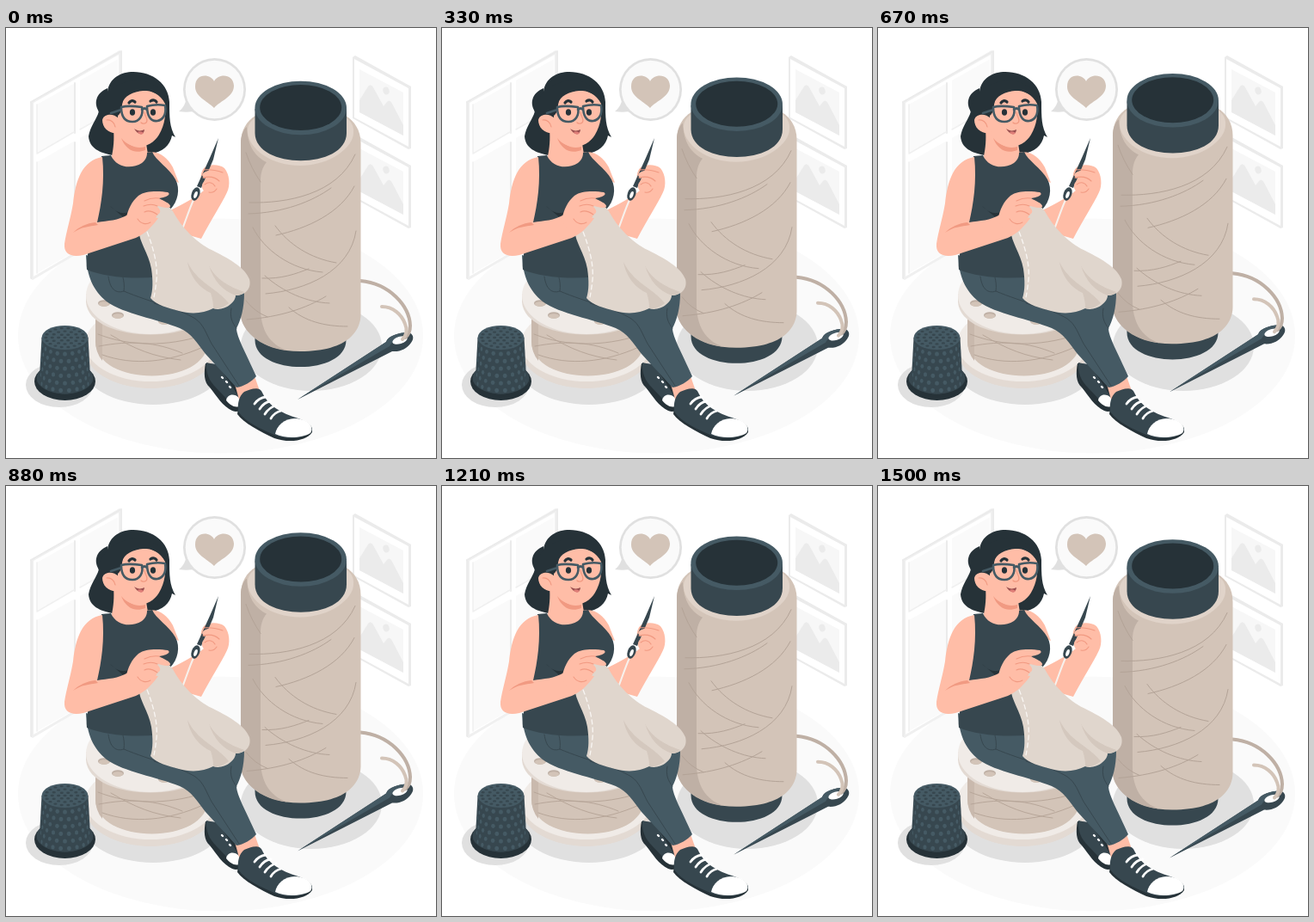
An HTML page with a canvas that plays this animation: 500 px wide and 500 px high, repeating every 1540 ms.

```html
<!DOCTYPE html>
<html lang="en">
<head>
<meta charset="utf-8">
<style>
html, body { margin: 0; width: 100%; height: 100%; overflow: hidden; background: #fff; }
canvas { display: block; width: 500px; height: 500px; }
</style>
</head>
<body>
<canvas id="stage"></canvas>
<script>
const canvas = document.getElementById('stage');
const dpr = window.devicePixelRatio || 1;
canvas.width = canvas.height = 500 * dpr;
const ctx = canvas.getContext('2d');

const LOOP = 1540, PHASE = 40, REST = .5, LIFT = 10;
const INK = '#263238', DARK = '#37474f', SLATE = '#455a64';
const SKIN = '#ffbda7', BLUSH = '#f19a82';
const BEIGE = '#d3c4b8', TAUPE = '#bfb0a5', CLOTH = '#e0d6cd', CREAM = '#f0ebe7';
const SHADOW = '#e0e0e0';

function fill(color, d) {
  ctx.fillStyle = color;
  ctx.fill(new Path2D(d));
}

function line(color, width, d, dash = []) {
  ctx.strokeStyle = color;
  ctx.lineWidth = width;
  ctx.lineCap = ctx.lineJoin = 'round';
  ctx.setLineDash(dash);
  ctx.stroke(new Path2D(d));
}

function oval(color, x, y, rx, ry = rx, angle = 0) {
  ctx.beginPath();
  ctx.ellipse(x, y, rx, ry, angle, 0, Math.PI * 2);
  ctx.fillStyle = color;
  ctx.fill();
}

function drawWindow() {
  fill('#f0f0f0', 'M28 86L132 26 135 28V232L31 293 28 291Z');
  fill('#fff', 'M32 87L131 31V231L32 289Z');
  const pane = (x, y, w, h) => fill('#fafafa', `M${x} ${y}l${w} ${-w * .565}v${h}l${-w} ${w * .565}Z`);
  pane(36, 89, 43, 56);
  pane(36, 156, 43, 129);
  pane(86, 61, 44, 56);
  pane(86, 128, 44, 128);
  line('#ebebeb', 2, 'M29.5 87V291M80 64V122M80 133V262M29 86L134 27V60');
  line('#f0f0f0', 1.5, 'M36 89V145M36 156V285M36 146L79 121M86 118L130 93');
}

function drawPicture(y) {
  ctx.save();
  ctx.translate(0, y);
  fill('#ebebeb', 'M403 34L406 32 471 68V140L468 141 403 105Z');
  fill('#fff', 'M405 36L468 70V138L405 104Z');
  fill('#f7f7f7', 'M411 48L462 75V125L411 98Z');
  fill('#ebebeb', 'M411 84L421 68Q424 64 427 69L439 91 443 86Q446 82 449 88L462 113V125L411 98Z');
  oval('#ebebeb', 442, 73, 3.6, 4.4, -.3);
  ctx.restore();
}

function drawBubble() {
  fill(SHADOW, 'M210 80C209 88 206 93 201 97 208 98 216 98 222 96Z');
  oval(SHADOW, 242.5, 71.5, 36.5);
  oval('#fafafa', 242.5, 71.5, 33.8);
  fill(BEIGE, 'M242 62C238 53 220 52 220 68C220 80 233 84 242 93C250 84 265 80 265 67C264 52 246 53 242 62Z');
}

function drawNeedle() {
  fill(DARK, 'M339 432L442 365C444 358 457 354 467 354C474 355 475 361 471 366C466 373 458 377 449 376Z');
  fill(SLATE, 'M339 432L442 365C444 358 457 354 467 354C460 358 450 362 446 370Z');
  oval('#fff', 458, 363, 9, 4.2, -.3);
  line(TAUPE, 4, 'M412 294C446 297 469 323 470 346C470 353 467 358 464 360');
  line(BEIGE, 4, 'M437 324C450 324 460 333 464 344C467 351 466 357 461 362');
}

function drawBigSpool() {
  fill(DARK, 'M289.5 350H395.5V363C395.5 404.5 289.5 404.5 289.5 363Z');
  fill(BEIGE, 'M273 134C273 119 280 108 290 102H395C405 108 412.5 119 412.5 134V333C412.5 350 400 376 342 376C297 376 273 351 273 333Z');
  fill(TAUPE, 'M273 134C273 125 276 118 280 115C281 137 289 149 303 156C298 162 296 169 296 178V326C296 350 306 368 327 375C294 372 273 350 273 333Z');
  fill('#e0d3c9', 'M281 122C280 112 286 106 293 103H393C401 107 405 114 404 122C404 138 378 160 342 160C307 160 283 140 281 122Z');
  line('#b3a397', 1, `M279 145Q285 163 296 179
    M283 203C326 204 385 194 406 147M282 216C322 215 356 202 378 186
    M287 232C300 258 331 281 368 284M313 230C329 252 354 268 384 273
    M314 241C351 233 389 215 405 184M302 309C349 305 400 283 407 236
    M298 291C320 292 337 286 352 280M301 288C322 307 350 319 376 320
    M280 339C319 336 349 326 372 312M329 325C347 341 370 347 397 347
    M279 317Q289 330 304 336`);
  fill(DARK, 'M289.5 94H396V122C396 165 289.5 165 289.5 122Z');
  oval(SLATE, 342.7, 93, 53.3, 31.3);
  oval(INK, 342.7, 92.5, 47.5, 26.5);
}

function drawSmallSpool() {
  oval('#e3dad3', 168, 374, 76, 45);
  oval(CREAM, 168, 367, 76, 44);
  fill(BEIGE, 'M104 330H235V364C235 418 104 418 104 364Z');
  fill('#c9b9ad', 'M104 330H112V387Q104 377 104 364Z');
  line('#b7a699', 1, 'M107 356C145 371 188 370 227 358M108 370C145 363 174 365 205 378M112 380C148 393 189 389 229 371M122 357C151 374 171 382 203 386');
  fill('#e3dad3', 'M93 309V319C97 369 239 369 243 319V309Z');
  oval(CREAM, 168, 311, 75, 45);
  for (const [x, y] of [[114, 320], [130, 334], [184, 341]]) {
    oval(TAUPE, x, y, 7, 3.8);
    oval(BEIGE, x, y + 1, 6, 2.7);
  }
}

function drawThimble() {
  oval(SHADOW, 62, 415, 39, 26);
  oval(INK, 68.5, 411, 35.5, 22);
  oval(DARK, 68.5, 407, 33, 18.5);
  fill(DARK, 'M41.5 360L39 406C42 432 95 432 98 406L95.5 360Z');
  for (let row = 0; row < 6; row++) {
    for (let k = -4; k <= 4; k++) {
      const a = (k + (row % 2) / 2) * .33;
      oval(SLATE, 68.5 + (27 + row * .5) * Math.sin(a), 366 + row * 8.5 + 13 * Math.cos(a), 2.4 * Math.cos(a), 2.6);
    }
  }
  oval(SLATE, 68.5, 360, 27, 14);
  for (let ring = 0; ring < 4; ring++) {
    const count = ring ? ring * 6 : 1;
    for (let k = 0; k < count; k++) {
      const a = k / count * Math.PI * 2;
      oval(DARK, 68.5 + ring * 7.4 * Math.cos(a), 360 + ring * 3.7 * Math.sin(a), 2.1, 1.2);
    }
  }
}

function drawLegs() {
  fill(INK, 'M232 390C230 401 230 412 237 418C245 428 252 440 263 445C270 448 275 444 275 438L270 420 246 391Z');
  fill(DARK, 'M233 389C232 402 237 411 244 418L263 438 272 431 247 392Z');
  fill('#fff', 'M256 433C257 426 265 424 271 430L271 440C266 442 260 438 256 433Z');
  line('#fff', 2.4, 'M251 406l1 1M256 411l1 1M260 417l1 1');
  fill(SKIN, 'M266 414L288 402 295 422 281 431 271 432Z');
  fill(SLATE, 'M93 264C94 288 101 305 117 318C138 333 175 338 202 349C216 355 222 366 232 379L268 418C276 417 286 411 291 405C279 378 268 359 268 349C273 340 277 326 277 308L230 290H172Z');
  line(DARK, 1, 'M119 289C121 304 128 309 137 306C138 300 137 294 136 290M137 306C168 319 201 326 220 338C230 345 232 354 239 367L271 416M172 320C190 326 204 328 221 328M262 326C260 336 263 343 268 349');
  fill(INK, 'M269 449C276 459 295 469 312 477C329 483 350 480 356 470V465L270 440Z');
  fill(DARK, 'M270 446C269 436 271 428 277 423C284 420 295 416 298 424C304 438 319 448 340 454C351 458 357 463 356 468C349 478 328 479 314 474C298 467 279 459 270 446Z');
  fill('#fff', 'M313 472C315 461 327 451 343 455C354 458 358 465 354 471C344 477 325 478 313 472Z');
  line('#fff', 2.8, 'M289 437Q294 430 302 429M295 443Q300 435 308 434M301 449Q306 441 314 439M308 454Q312 447 320 445');
}

function drawFace() {
  fill(INK, 'M118 74C120 58 134 51 148 51C171 51 189 65 190 86C190 104 190 115 197 127L193 125C191 136 182 145 168 146L124 148C109 145 97 140 96 126C98 114 105 107 108 97C102 88 104 76 118 70Z');
  fill(SKIN, 'M125 117C126 130 125 140 123 149C132 164 154 163 165 147L162 128Z');
  fill(BLUSH, 'M134 128C143 137 152 141 162 138V142C149 147 139 141 134 128Z');
  fill(SKIN, 'M130 101C134 96 133 86 140 79C152 70 176 69 185 88C186 100 185 112 178 124C172 134 162 139 151 138C138 135 132 128 130 116Z');
  fill(SKIN, 'M131 105C124 98 113 100 112 107C112 116 120 124 131 122Z');
  line(BLUSH, 1.2, 'M117 107C122 106 126 110 127 115');
  fill(INK, 'M107 94C113 68 148 53 170 65C180 70 188 79 188 93C184 83 177 76 167 73C155 72 141 76 136 85C134 92 135 98 130 102C123 98 113 100 110 108Z');
  line(INK, 3.2, 'M143 87C145 84 148 84 150 86M168 85C171 83 174 84 175 86');
  oval(INK, 147, 98, 3.1, 3.8);
  oval(INK, 171, 98, 3.1, 3.8);
  line(BLUSH, 1.3, 'M161 98C162 104 166 107 163 110C161 112 158 111 157 110');
  line(SLATE, 2.6, 'M134 92C141 90 151 91 158 92C160 102 155 109 147 109C138 109 134 103 134 92ZM164 91C171 89 179 89 185 90C187 101 182 107 176 108C168 109 164 102 164 91ZM158 95Q161 92 164 95M134 95L122 99');
  fill('#994f50', 'M149 117C153 120 157 120 161 118C161 124 154 126 149 117Z');
  fill('#df7e78', 'M153 121C156 120 159 121 160 122C158 125 155 124 153 121Z');
}

function drawTorso() {
  fill(SKIN, 'M163 145C177 142 187 150 194 162L201 180 176 170Z');
  fill(SKIN, 'M123 149C137 146 145 150 158 145L170 145 168 164H120Z');
  fill(DARK, 'M111 149L122 148C128 162 145 165 158 157C163 153 164 149 164 145L170 144C174 154 190 163 197 176C203 187 200 202 191 211L198 286C164 294 117 291 94 281C92 268 99 247 104 226Z');
  fill(INK, 'M121 207C132 218 142 218 150 207L140 223Z');
}

function drawRightHand() {
  fill(SKIN, 'M230 163C235 158 248 158 254 163C260 170 261 183 257 191C250 206 239 222 227 245L199 237 191 212 203 206C212 201 222 196 230 189C226 179 225 169 230 163Z');
  line('#f7f1ec', 2, 'M218 200C213 211 210 221 205 234');
  fill(DARK, 'M247 128L241 153 227 186 222 184 237 151Z');
  oval(DARK, 220.5, 193, 4.7, 8, .35);
  oval('#fff', 220.5, 194, 1.9, 4.2, .35);
  fill(SKIN, 'M228 171C231 164 243 165 251 169C246 173 237 172 230 175Z');
  fill(SKIN, 'M229 180C234 174 244 174 249 179L236 192C229 191 226 185 229 180Z');
  line(BLUSH, 1.1, 'M230 165C238 164 246 166 252 168M229 174C237 172 244 174 248 178M231 182C236 178 241 180 243 184M236 191C240 192 243 190 245 187');
}

function drawCloth() {
  fill(CLOTH, 'M154 234C158 221 165 208 175 205C184 203 190 207 194 213C204 232 222 250 239 258C257 267 278 278 283 292C286 304 277 311 267 311C267 320 252 330 241 326C230 332 215 333 201 329C190 326 174 322 168 314C171 305 171 294 169 280C166 262 155 250 154 234Z');
  const fold = '#d4c8be';
  fill(fold, 'M211 272C214 290 226 303 238 308C240 314 241 320 241 326C247 327 254 324 259 320C245 302 222 296 211 272Z');
  fill(fold, 'M236 276C243 292 260 301 277 307C274 310 271 311 267 311C253 306 241 294 236 276Z');
  line('#f9f6f3', 1.3, 'M161 229C168 247 177 270 175 293C174 302 173 308 172 313', [5, 4]);
}

function drawLeftArm() {
  fill(SKIN, 'M112 150C89 154 81 176 78 204C75 222 70 237 68 251C67 263 76 267 90 264L151 244C162 239 170 231 177 221L142 217C130 224 119 224 106 226C111 205 115 178 112 150Z');
  fill(BLUSH, 'M104 226C94 227 85 231 78 238C88 231 96 231 107 229Z');
  fill(SKIN, 'M139 224C142 210 146 202 154 195C163 188 181 190 188 191C193 194 185 197 178 198C183 201 192 204 191 208C187 211 180 207 175 207C180 211 181 215 176 217C172 228 161 236 150 240Z');
  line(BLUSH, 1.1, 'M178 198C171 197 165 199 161 201M176 207C170 204 165 205 160 207M176 217C169 212 165 212 161 214M153 222C157 228 163 229 168 226');
}

function draw(time) {
  const t = (time + PHASE) % LOOP / LOOP;
  const lift = LIFT * (1 - Math.abs(1 - 2 * t));

  ctx.setTransform(dpr, 0, 0, dpr, 0, 0);
  ctx.fillStyle = '#fff';
  ctx.fillRect(0, 0, 500, 500);
  oval('#fafafa', 249.5, 358, 235.5, 136.5);
  drawWindow();
  drawPicture(0);
  drawPicture(92);
  oval(SHADOW, 355, 370, 82, 52);
  oval(SHADOW, 171, 390, 83, 48);
  drawBubble();

  ctx.save();
  ctx.translate(0, REST - lift);
  drawNeedle();
  drawBigSpool();
  ctx.restore();

  drawSmallSpool();
  drawThimble();
  drawLegs();
  drawFace();
  drawTorso();
  drawRightHand();
  drawCloth();
  drawLeftArm();
}

function frame() {
  draw(performance.now());
  requestAnimationFrame(frame);
}
frame();
</script>
</body>
</html>
```
